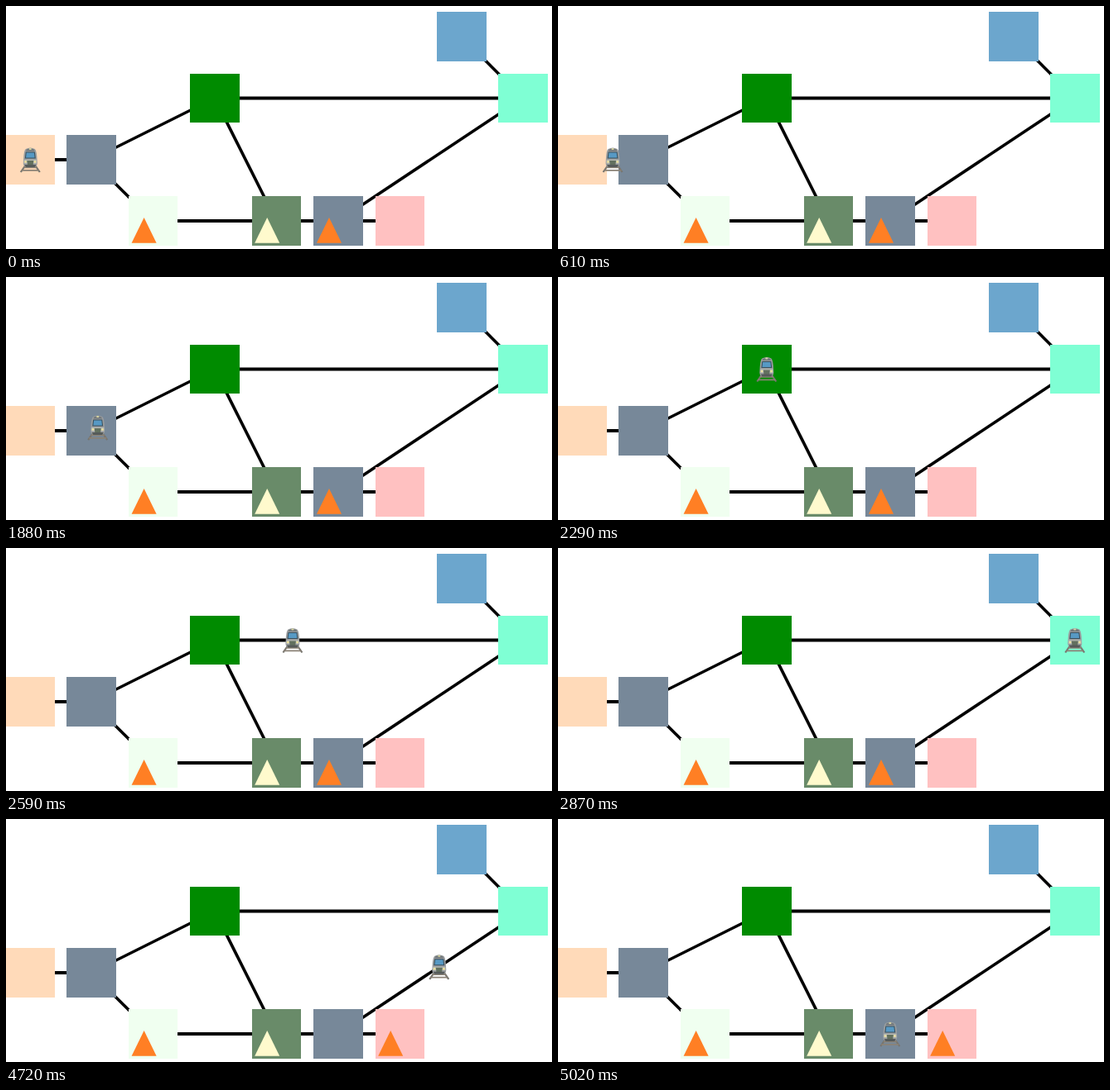
An HTML page that plays this animation: 659x294 px, repeating every 6.24 s.

```html
<!DOCTYPE html>
<html lang="en">
<head>
<meta charset="utf-8">
<title>Rail graph</title>
<style>
  html, body { margin: 0; width: 100%; height: 100%; overflow: hidden; background: #fff; }
  svg { display: block; width: 100%; height: 100%; }
</style>
</head>
<body>
<svg viewBox="0 0 659 294">
  <g id="tracks" stroke="#000" stroke-width="3.7"></g>
  <g id="stations" shape-rendering="crispEdges"></g>
  <g id="cargo"></g>
  <g id="train">
    <g fill="none" stroke="#77756f">
      <path d="M-6 7L-11.5 15M6 7L11.5 15" stroke-width="2.2"/>
      <path d="M-8 9.3H8M-10.5 12.8H10.5" stroke="#8b8276" stroke-width="1.7"/>
    </g>
    <path d="M-5.5-13Q0-16 5.5-13Q7.5-11 8-4L8.5 4Q8.3 8 5.5 8.5H-5.5Q-8.3 8-8.5 4L-8-4Q-7.5-11-5.5-13Z" fill="#9a9d9f"/>
    <path d="M-4.5-12.5Q0-14.6 4.5-12.5L5.2-10.5H-5.2Z" fill="#73797c"/>
    <rect x="-1.6" y="-14" width="3.2" height="2" rx="1" fill="#d5d3a2"/>
    <path d="M-5.5-9.5H5.5L6.5-1.5H-6.5Z" fill="#38505f"/>
    <path d="M-4.6-8.5H4.6L5.3-2.5H-5.3Z" fill="#5799c4"/>
    <path d="M-7.5 0H7.5L7.8 4.5H-7.8Z" fill="#b9bcb5"/>
    <path d="M-4 1H4L3.2 7.5H-3.2Z" fill="#62705f"/>
    <circle cx="-5.7" cy="2.5" r="1.3" fill="#f1e49a"/>
    <circle cx="5.7" cy="2.5" r="1.3" fill="#f1e49a"/>
    <path d="M-7 6H7L5.5 9H-5.5Z" fill="#565b5a"/>
  </g>
</svg>
<script>
const LOOP = 6240;
const $ = id => document.getElementById(id);

function add(parent, tag, attrs) {
  const el = document.createElementNS('http://www.w3.org/2000/svg', tag);
  for (const key in attrs) el.setAttribute(key, attrs[key]);
  return parent.appendChild(el);
}

// left, top, right, bottom, colour
const stations = {
  start: [0, 156, 59, 216, '#ffdab9'],
  west: [73, 156, 133, 216, '#778899'],
  green: [222, 82, 282, 141, '#008b00'],
  aqua: [594, 82, 654, 141, '#7fffd4'],
  blue: [520, 7, 580, 67, '#6ca6cd'],
  mint: [148, 230, 207, 290, '#f0fff0'],
  sage: [297, 230, 356, 290, '#698b69'],
  east: [371, 230, 431, 290, '#778899'],
  pink: [446, 230, 505, 290, '#ffc1c1']
};

const center = ([l, t, r, b]) => [(l + r) / 2 - 0.2, (t + b) / 2];

function link(a, b) {
  const [x1, y1] = center(stations[a]), [x2, y2] = center(stations[b]);
  add($('tracks'), 'line', { x1, y1, x2, y2, 'stroke-width': y1 === y2 ? 4.2 : 3.6 });
}

[['start', 'west'], ['west', 'green'], ['west', 'mint'], ['mint', 'sage'], ['green', 'sage'],
 ['green', 'aqua'], ['sage', 'east'], ['east', 'pink'], ['east', 'aqua'], ['blue', 'aqua']]
  .forEach(pair => link(...pair));

for (const [l, t, r, b, fill] of Object.values(stations)) {
  add($('stations'), 'rect', { x: l, y: t, width: r - l, height: b - t, fill });
}

const triangle = (x, fill) =>
  add($('cargo'), 'path', { d: `M${x} 256L${x + 15} 286.7H${x - 15}Z`, fill });

triangle(166.6, '#ff7f24');
triangle(315.2, '#fffacd');
const mover = triangle(390, '#ff7f24');

// Each leg: from, to, then [time, progress] steps that hold until the next one.
const legs = [
  ['start', 'west', [[610, 0.5], [735, 0.88], [860, 1]]],
  ['west', 'green', [[1880, 0.053], [2010, 0.65], [2190, 0.97], [2290, 1]]],
  ['green', 'aqua', [[2590, 0.253], [2750, 0.85], [2870, 1]]],
  ['aqua', 'east', [[4720, 0.453], [4870, 0.95], [5020, 1]]]
];
const cargoSteps = [[4020, 0.3], [4140, 0.8], [4290, 1]];

const progress = (steps, t) => steps.reduce((p, [at, value]) => t >= at ? value : p, 0);

function trainAt(t) {
  let pos = center(stations.start);
  for (const [from, to, steps] of legs) {
    const p = progress(steps, t);
    if (!p) break;
    const a = center(stations[from]), b = center(stations[to]);
    pos = a.map((v, i) => v + (b[i] - v) * p);
  }
  return pos;
}

function draw(t) {
  $('train').setAttribute('transform', `translate(${trainAt(t)})`);
  mover.setAttribute('transform', `translate(${74.2 * progress(cargoSteps, t)})`);
}

const begin = performance.now();
function tick() {
  draw((performance.now() - begin) % LOOP);
  requestAnimationFrame(tick);
}
tick();
</script>
</body>
</html>
```
